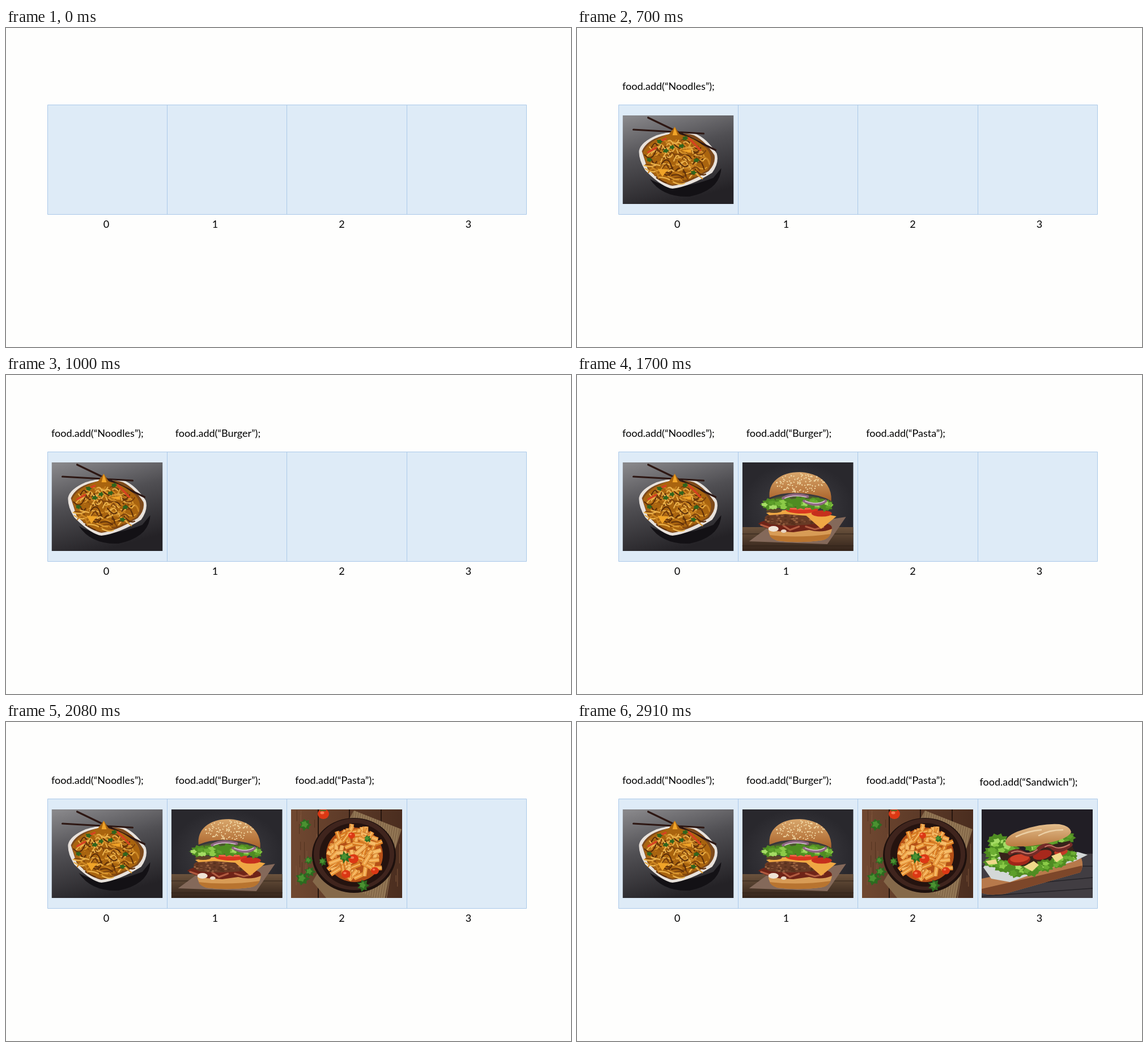
An HTML page that plays this animation: 997x562 px, repeating every 3870 ms.

```html
<!DOCTYPE html>
<html lang="en">
<head>
<meta charset="utf-8">
<title>Adding items to a list</title>
<style>
  html, body { margin: 0; width: 100%; height: 100%; overflow: hidden; background: #fefefd; }
  svg { display: block; }
  text { font: 18px Lato, Carlito, sans-serif; fill: #000; }
</style>
</head>
<body>
<svg id="stage" width="997" height="562" viewBox="0 0 997 562">
  <defs>
    <linearGradient id="slate" x1=".1" y1="0" x2=".45" y2="1">
      <stop offset="0" stop-color="#88878a"/><stop offset=".45" stop-color="#504f53"/><stop offset="1" stop-color="#242226"/>
    </linearGradient>
    <radialGradient id="dusk"><stop offset="0" stop-color="#444348"/><stop offset="1" stop-color="#29282d"/></radialGradient>
    <linearGradient id="table" x2="0" y2="1"><stop stop-color="#6b533d"/><stop offset="1" stop-color="#33231a"/></linearGradient>
    <linearGradient id="bun" x2="0" y2="1"><stop stop-color="#d9a76c"/><stop offset="1" stop-color="#a9622a"/></linearGradient>
    <linearGradient id="wood"><stop stop-color="#704831"/><stop offset="1" stop-color="#4a2d1f"/></linearGradient>
    <linearGradient id="crust" x2="0" y2="1"><stop stop-color="#e3bd8c"/><stop offset="1" stop-color="#b97a40"/></linearGradient>
  </defs>
</svg>
<script>
const LOOP = 3870;
const stage = document.getElementById('stage');

let seed = 7;
const rand = (lo = 0, hi = 1) => {
  seed = (seed * 16807) % 2147483647;
  return lo + (hi - lo) * seed / 2147483647;
};
const pick = list => list[Math.floor(rand(0, list.length))];
const repeat = (n, make) => Array.from({ length: n }, (_, i) => make(i)).join('');

const rect = (x, y, w, h, fill) => `<rect x="${x}" y="${y}" width="${w}" height="${h}" fill="${fill}"/>`;
const path = (d, fill) => `<path d="${d}" fill="${fill}"/>`;
const line = (d, color, width, cap = 'round') =>
  `<path d="${d}" fill="none" stroke="${color}" stroke-width="${width}" stroke-linecap="${cap}"/>`;
const oval = (x, y, rx, ry, fill, turn = 0) =>
  `<ellipse cx="${x}" cy="${y}" rx="${rx}" ry="${ry}" fill="${fill}" transform="rotate(${turn} ${x} ${y})"/>`;

// Ragged outline for herbs and lettuce; depth sets how deep the notches go
function leaf(x, y, rx, ry, fill, n = 14, depth = .5) {
  const points = Array.from({ length: n }, (_, i) => {
    const a = i * 2 * Math.PI / n, r = i % 2 ? 1 - depth * rand(.6, 1) : rand(.85, 1.1);
    return `${(x + rx * r * Math.cos(a)).toFixed(1)} ${(y + ry * r * Math.sin(a)).toFixed(1)}`;
  });
  return path(`M${points.join('L')}Z`, fill);
}

// Ruffled lettuce: dark base with lighter folds scattered on it
const lettuce = (x, y, rx, ry) => leaf(x, y, rx, ry, '#4f8c22', 20, .28)
  + repeat(5, () => {
    const [fx, fy] = inside(x, y, rx * .65, ry * .6);
    return leaf(fx, fy, rx * .38, ry * .38, pick(['#6cae33', '#8ccb48', '#a5db64', '#5d9f2a']), 10, .4);
  });

// Random point inside an ellipse
function inside(x, y, rx, ry) {
  const a = rand(0, 2 * Math.PI), r = Math.sqrt(rand());
  return [x + rx * r * Math.cos(a), y + ry * r * Math.sin(a)];
}

function noodles() {
  const strand = () => {
    const [x, y] = inside(98, 80, 53, 38), r = rand(5, 13);
    return line(`M${x - r} ${y}q${r} ${rand(-18, 16)} ${2 * r * .8} ${rand(-8, 10)}`,
      pick(['#dc9a32', '#c8811f', '#7d430d', '#e9b04a', '#5d2f0a', '#a5610f']), 2.2);
  };
  const herbs = [[65, 46], [87, 56], [110, 40], [76, 62], [104, 54], [130, 79], [125, 101], [47, 78]];
  return rect(0, 0, 196, 156, 'url(#slate)')
    + path('M48 112Q90 138 160 110L174 93Q172 132 118 143Q70 145 48 112Z', '#131115')
    + path('M29 62Q32 47 60 35Q95 24 128 32Q148 40 166 67Q171 83 158 101Q120 125 88 129Q70 127 40 97Q28 78 29 62Z', '#e8e2dc')
    + path('M34 63Q42 44 70 36Q100 27 126 35Q146 45 162 70Q165 84 152 98Q114 121 88 124Q72 122 44 94Z', '#7d4a1c')
    + line('M19 25L143 32M45 4L164 61', '#2d1713', 3.2)
    + path('M36 65Q46 44 82 33L92 20L101 34Q126 38 148 58Q163 76 150 96Q112 119 88 122Q67 117 44 92Z', '#a9640f')
    + repeat(150, strand)
    + path('M88 35L92 20L97 35ZM62 94L80 95L70 108ZM103 62L122 59L120 66Z', '#f0a428')
    + line('M45 65L59 57M117 40L137 61M64 47L76 41', '#d64321', 3.5)
    + herbs.map(([x, y]) => leaf(x, y, 6, 4.5, '#31641d', 10)).join('');
}

function burger() {
  const sesame = () => {
    const [x, y] = inside(102, 37, 43, 17);
    return oval(x, y, 1.4, .9, '#f2d9a6', rand(0, 180));
  };
  const crumb = () => oval(rand(42, 150), rand(93, 109), 2.5, 1.6, pick(['#9a6240', '#58301d', '#7b4a30']));
  return rect(0, 0, 196, 156, 'url(#dusk)')
    + rect(0, 114, 196, 42, 'url(#table)')
    + line('M0 126H196M0 147H196', '#2f2219', 1)
    + path('M12 139L42 117L183 96L150 144Z', '#84695a')
    + path('M46 118L158 114Q159 130 142 137Q100 143 62 138Q47 133 46 118Z', '#d89c56')
    + path('M48 128Q100 134 156 126Q152 135 142 137Q100 143 62 138Q50 134 48 128Z', '#b87430')
    + path('M28 108Q40 98 60 106H140Q160 108 158 117Q140 125 118 119L90 123L62 121L40 115Z', '#6f2418')
    + line('M33 110L48 115M72 111L84 119L100 113M112 113L128 118L143 114', '#b15b40', 3)
    + oval(55, 117, 9, 5, '#f0e4d6') + oval(73, 121, 5, 3, '#e9d6c3')
    + path('M40 96Q48 88 70 90H140Q156 92 154 103Q148 110 130 108Q90 114 50 109Q38 106 40 96Z', '#683a25')
    + repeat(70, crumb)
    + path('M42 89Q70 82 110 83L166 95L139 117L113 94L76 91L48 93Z', '#efa744')
    + oval(56, 85, 14, 4, '#5e4328')
    + oval(105, 83, 29, 7, '#d9361f') + oval(140, 90, 18, 5.5, '#c52f1d') + oval(104, 80, 26, 3.5, '#ec6546')
    + path('M50 64Q100 48 157 68L150 80H52Z', '#4c5730')
    + lettuce(50, 74, 18, 11) + lettuce(76, 72, 20, 13) + lettuce(103, 71, 20, 12)
    + lettuce(129, 72, 19, 12) + lettuce(148, 76, 13, 11)
    + line('M72 63Q90 53 115 60M109 68Q133 80 147 68', '#8e6580', 5)
    + line('M75 63Q90 56 113 61M111 68Q131 76 145 68', '#d9c3d3', 1.5)
    + path('M48 62Q46 42 60 30Q75 17 102 17Q136 19 150 40Q158 52 157 68Q140 57 102 54Q70 52 48 62Z', 'url(#bun)')
    + repeat(110, sesame);
}

function pasta() {
  const penne = () => {
    const [x, y] = inside(112, 79, 46, 44), a = rand(-1.9, .5), r = rand(8, 12);
    const dx = r * Math.cos(a), dy = r * Math.sin(a), d = `M${x - dx} ${y - dy}l${2 * dx} ${2 * dy}`;
    return line(d, '#b9601a', 8.5, 'butt')
      + line(d, pick(['#ec9a3c', '#f0a549', '#e18528', '#f3b35c']), 7, 'butt')
      + line(d, '#f8c678', 1.5, 'butt');
  };
  const herbs = [[25, 27, 12], [20, 122, 13], [33, 110, 10], [56, 92, 8], [31, 90, 8], [95, 84, 11], [135, 52, 7], [127, 134, 11]];
  const tomato = (x, y, r) => oval(x, y, r, r * .9, '#dc3814') + oval(x - 2, y - 2, r * .35, r * .25, '#f77a50');
  return rect(0, 0, 196, 156, 'url(#wood)')
    + line('M48 0V156M103 0V156M159 0V156', '#26160f', 2)
    + repeat(40, () => line(`M${rand(0, 196)} ${rand(0, 120)}v${rand(10, 35)}`, pick(['#543421', '#7d543a']), 1))
    + path('M111 2L195 35L182 76L166 156H62L38 127Z', '#85694a')
    + repeat(20, i => line(`M${113 + i * 4} ${3 + i * 1.6}l-22 130`, '#a98f68', .8))
    + oval(111, 81, 74, 66, '#1d100d') + oval(111, 79, 71, 63, '#3f241d') + oval(112, 80, 62, 56, '#25130f')
    + oval(112, 80, 50, 48, '#b65017')
    + repeat(85, penne)
    + tomato(57, 8, 10) + tomato(110, 87, 9) + tomato(97, 114, 8) + tomato(107, 46, 6) + tomato(148, 108, 7)
    + line('M52 2L61 2', '#47722a', 2)
    + herbs.map(([x, y, r]) => leaf(x, y, r, r, '#2d6a20') + leaf(x - 1, y - 1, r * .6, r * .6, '#4a9131', 10)).join('');
}

function sandwich() {
  const back = [[28, 56, 17], [22, 76, 16], [46, 68, 18], [120, 54, 17], [148, 50, 15], [92, 64, 16]];
  const front = [[18, 93, 13], [38, 100, 16], [62, 108, 16], [88, 107, 15], [112, 99, 15], [136, 92, 15], [156, 82, 13]];
  const greens = list => list.map(([x, y, r]) => lettuce(x, y, r * 1.15, r * .8)).join('');
  return rect(0, 0, 196, 156, '#211e25')
    + rect(0, 78, 196, 78, '#413d42')
    + line('M0 100H196M0 139L196 120M0 153L196 139', '#252328', 1.5)
    + path('M0 122L176 86Q181 100 174 111L40 149Q10 152 0 147Z', '#b7794b')
    + path('M0 140L177 99Q178 106 174 111L40 149Q10 152 0 147Z', '#7d472a')
    + path('M3 102L17 84L170 75L187 80L165 91L104 109L50 128L17 122Z', '#d3d8d7')
    + path('M28 92Q40 116 75 115Q140 104 162 82L155 72L60 78Z', '#b98143')
    + greens(back)
    + path('M30 75Q75 84 104 67L156 55L163 72L119 91L72 101L36 94Z', '#37231a')
    + greens(front)
    + oval(66, 89, 20, 10, '#9f2519', -7) + oval(67, 86, 17, 7, '#cf4229', -7)
    + oval(107, 80, 17, 8, '#a8281c', -14) + oval(140, 75, 12, 6, '#c33a26', -10)
    + line('M50 77Q62 70 74 77T100 72M101 69Q115 58 126 68T157 62', '#732b27', 7)
    + line('M53 76Q63 71 74 76T98 71M112 66Q119 61 128 66T155 62', '#c77768', 2)
    + path('M74 101L92 91L101 98L89 109ZM123 82L139 76L144 85L132 93ZM7 91L25 88L28 96L12 97Z', '#efd98a')
    + path('M42 58Q43 45 72 36Q108 24 137 26Q156 29 158 40Q153 51 122 58Q85 67 55 65Q42 65 42 58Z', 'url(#crust)')
    + line('M61 48Q82 38 105 36M101 46Q119 36 143 36', '#ecd0a6', 2.5);
}

const appear = (at, body) => `<g data-at="${at}">${body}</g>`;
const label = (x, y, text, anchor = 'start') => `<text x="${x}" y="${y}" text-anchor="${anchor}">${text}</text>`;
const photo = (x, body) => `<svg x="${x}" y="154" width="196" height="156" viewBox="0 0 196 156">${body}</svg>`;

const items = [
  { name: 'Noodles', x: 80, y: 109, called: 370, added: 700, left: 80.5, draw: noodles, index: 177 },
  { name: 'Burger', x: 298.7, y: 109, called: 1000, added: 1370, left: 291.7, draw: burger, index: 369 },
  { name: 'Pasta', x: 510.2, y: 109, called: 1700, added: 2080, left: 503, draw: pasta, index: 592.5 },
  { name: 'Sandwich', x: 710.6, y: 112, called: 2540, added: 2910, left: 714, draw: sandwich, index: 816 }
];

stage.insertAdjacentHTML('beforeend',
  rect(73.5, 135.5, 845, 193, '#deebf7')
  + line('M73.5 135.5H918.5V328.5H73.5ZM284.5 135.5V328.5M495.5 135.5V328.5M707.5 135.5V328.5', '#abc9e9', 1, 'butt')
  + items.map((item, i) =>
    label(item.index, 352, i, 'middle')
    + appear(item.called, label(item.x, item.y, `food.add(“${item.name}”);`))
    + appear(item.added, photo(item.left, item.draw()))).join(''));

const steps = [...stage.querySelectorAll('[data-at]')];
function render() {
  const t = performance.now() % LOOP;
  for (const step of steps) step.style.display = t >= step.dataset.at ? '' : 'none';
  requestAnimationFrame(render);
}
render();
</script>
</body>
</html>
```
